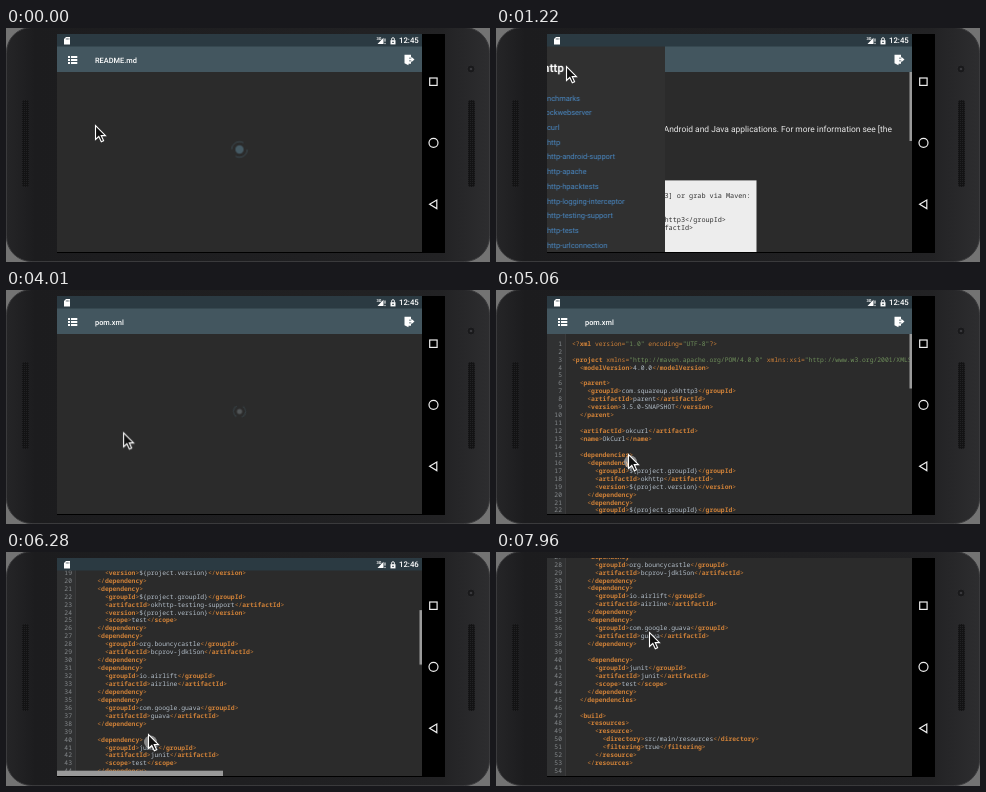
An HTML page that plays this animation: 484 px wide and 234 px high, repeating every 8 s.

```html
<!DOCTYPE html>
<html lang="en">
<head>
<meta charset="utf-8">
<title>Code browser on a phone</title>
<style>
@property --s { syntax: "<number>"; inherits: true; initial-value: 0; }
html, body { margin: 0; width: 100%; height: 100%; overflow: hidden; background: #737373; }
svg { display: block; width: 484px; height: 234px; text-rendering: geometricPrecision; font-family: Roboto, sans-serif; }
.code, .block { font-family: "Noto Sans Mono", "DejaVu Sans Mono", monospace; }
.code { font-size: 6.36px; fill: #b4bfca; }
.block { font-size: 6.83px; fill: #333; }
.num { fill: #85898c; text-anchor: end; }
.tag { fill: #cf8138; }
.name { font-weight: 700; }
.str { fill: #6f8f5b; }
.title { font-size: 7.4px; font-weight: 500; fill: #fff; }
.tree { font-size: 7.45px; fill: #4a8ac6; }
.line { fill: none; stroke: #999; stroke-width: .8; }

/* 1% = 80 ms */
#screen, #screen * { animation: 0s linear infinite; animation-duration: 8s; }
#screen { animation-name: scroll; }
#page { transform: translateY(calc(var(--s) * -1px)); }
#bar { transform: translateY(calc(max(-38, -1 * var(--s)) * 1px)); }
#thumb { transform: translateY(calc((max(-26, -1 * var(--s)) + max(0, var(--s) - 26) * .268) * 1px)); }
#screen .readme { animation-name: readme; animation-timing-function: step-end; }
#screen .old { animation-name: old; animation-timing-function: step-end; }
#screen .new { animation-name: new; animation-timing-function: step-end; }
#screen .pom { animation-name: pom; animation-timing-function: step-end; }
#screen .early { animation-name: early; animation-timing-function: step-end; }
#screen .late { animation-name: late; animation-timing-function: step-end; }
#screen .closed { animation-name: closed; animation-timing-function: step-end; }
#screen .open { animation-name: open; animation-timing-function: step-end; }
#screen #thumb0 { animation-name: thumb0; }
#screen #thumb rect { animation-name: thumb; }
#screen #hthumb { animation-name: hthumb; }
#screen #status { animation-name: status; }
#screen #drawer { animation-name: drawer; }
#screen #scrim { animation-name: scrim; }
#screen #below { animation-name: below; }
#screen #spin { animation-name: spin; animation-timing-function: step-end; }
#screen #dot { animation-name: dot; }
#screen #ring { animation-name: ring; }
#screen #cursor { animation-name: cursor; }
#screen #touch { animation-name: touch; animation-timing-function: step-end; }

@keyframes scroll {
  0%, 63.5% { --s: 0; } 68.2% { --s: 98; } 72.75% { --s: 150; }
  78.5% { --s: 175.7; } 83% { --s: 196; } 93.6% { --s: 250; } 99.5%, to { --s: 255.4; }
}
@keyframes readme { 0% { opacity: 0; } 2.875% { opacity: 1; } 45.6%, to { opacity: 0; } }
@keyframes old { 0% { opacity: 1; } 45.6%, to { opacity: 0; } }
@keyframes new { 0% { opacity: 0; } 45.6%, to { opacity: 1; } }
@keyframes pom { 0% { opacity: 0; } 58%, to { opacity: 1; } }
@keyframes early { 0% { opacity: 1; } 69%, to { opacity: 0; } }
@keyframes late { 0% { opacity: 0; } 69%, to { opacity: 1; } }
@keyframes closed { 0% { opacity: 1; } 26%, to { opacity: 0; } }
@keyframes open { 0% { opacity: 0; } 26%, to { opacity: 1; } }
@keyframes thumb0 { 0%, 21.5% { opacity: 1; } 23%, to { opacity: 0; } }
@keyframes thumb { 0%, 95% { opacity: 1; } 98%, to { opacity: 0; } }
@keyframes hthumb { 0%, 63.5% { opacity: 0; } 64.5%, 95% { opacity: 1; } 98%, to { opacity: 0; } }
@keyframes status { 0%, 95.5% { transform: none; } 98.5%, to { transform: translateY(-14px); } }
@keyframes drawer {
  0%, 11.5% { transform: translateX(-159px); } 15.25% { transform: translateX(-41px); }
  18.4%, 45.6% { transform: none; } 49.4%, to { transform: translateX(-159px); }
}
@keyframes scrim { 0%, 15.25% { opacity: 0; } 18.4%, 45.6% { opacity: .6; } 49.4%, to { opacity: 0; } }
@keyframes below { 0%, 26% { transform: none; } 28.2%, to { transform: translateY(44.1px); } }
@keyframes spin { 0% { opacity: 1; } .62% { opacity: 0; } 46% { opacity: 1; } 54%, to { opacity: 0; } }
@keyframes dot {
  0%, 46% { transform: scale(1); fill: #455a64; } 50.1% { transform: scale(.62); fill: #525658; }
  54%, to { transform: scale(1); fill: #455a64; }
}
@keyframes ring { 0%, 46% { transform: rotate(0); } 50.1% { transform: rotate(120deg) scale(.78); } 54%, to { transform: rotate(240deg); } }
@keyframes touch { 0% { opacity: 0; } 61% { opacity: 1; } 68.2% { opacity: 0; } 78.2% { opacity: 1; } 93.6%, to { opacity: 0; } }
@keyframes cursor {
  0%, 2.875% { transform: translate(89px, 97px); }
  7.9%, 16% { transform: translate(70px, 38px); }
  20.9% { transform: translate(98px, 95px); }
  23%, 26% { transform: translate(102px, 98px); }
  28.25%, 32% { transform: translate(92px, 97px); }
  34.1% { transform: translate(93px, 117px); }
  36.25%, 40% { transform: translate(92px, 119px); }
  42.1%, 45% { transform: translate(91px, 139px); }
  50.1% { transform: translate(117px, 142px); }
  54.4% { transform: translate(131px, 171px); }
  55.1%, 57.5% { transform: translate(131px, 172px); }
  58%, 63.3% { transform: translate(132px, 164px); }
  68.2% { transform: translate(138px, 60px); }
  72.75% { transform: translate(140px, 90px); }
  78.2%, 78.6% { transform: translate(142px, 182px); }
  83% { transform: translate(144px, 156px); }
  93.6% { transform: translate(152px, 84px); }
  99.5%, to { transform: translate(153px, 80px); }
}
</style>
</head>
<body>
<svg viewBox="0 0 484 234">
  <defs>
    <linearGradient id="body">
      <stop stop-color="#252527"/><stop offset=".06" stop-color="#1c1c1e"/>
      <stop offset=".9" stop-color="#222224"/><stop offset="1" stop-color="#2d2d2f"/>
    </linearGradient>
    <pattern id="mesh" width="2" height="2" patternUnits="userSpaceOnUse">
      <rect width="2" height="2" fill="#131314"/><rect width="1" height="1" fill="#212123"/>
    </pattern>
    <clipPath id="clip"><rect x="51" y="6" width="365" height="218"/></clipPath>
    <path id="folder" d="M0 .8q0-.8.8-.8H3l1 1h3.3q.8 0 .8.8v4.4q0 .8-.8.8H.8q-.8 0-.8-.8z" fill="#73a9dd"/>
    <g id="file">
      <path d="M.5.5h4.2l2 2v6H.5z" fill="none" stroke="#9a9a9a" stroke-width=".9"/>
      <path d="M2 3.6h3.2M2 5.2h3.2M2 6.8h3.2" stroke="#9a9a9a" stroke-width=".7"/>
    </g>
  </defs>

  <rect x=".5" y="-.5" width="483" height="234" rx="25" fill="url(#body)" stroke="#3a3a3c"/>
  <rect x="16" y="72" width="7" height="87" rx="3" fill="url(#mesh)"/>
  <rect x="462" y="72" width="7" height="87" rx="3" fill="url(#mesh)"/>
  <circle cx="465" cy="41" r="4" fill="#19191b" stroke="#2b2b2d"/>
  <circle cx="465" cy="41" r="1.3" fill="#39393d"/>
  <rect x="51" y="6" width="388" height="219" fill="#000"/>
  <g fill="none" stroke="#eee" stroke-width="1.2">
    <rect x="423.7" y="50" width="7.4" height="7.4"/>
    <circle cx="427.5" cy="114.8" r="4.5"/>
    <path d="M423.6 176.3l7.2-4.3v8.6z"/>
  </g>

  <g clip-path="url(#clip)">
  <g id="screen">
    <rect x="51" y="6" width="365" height="218" fill="#2b2b2b"/>

    <g class="readme">
      <g fill="#e8e8e8" font-size="8.44">
        <text x="58" y="75" font-size="15" font-weight="700">OkHttp</text>
        <text x="58" y="104">An HTTP &amp; HTTP/2 client for Android and Java applications. For more information see [the</text>
        <text x="58" y="115">website][1] and [the wiki][2].</text>
        <text x="58" y="140" font-size="12" font-weight="700">Download</text>
      </g>
      <rect x="58" y="152.4" width="202.5" height="80" fill="#eee"/>
      <g class="block" id="block"></g>
      <rect id="thumb0" x="413.5" y="44" width="2.5" height="69" fill="#9b9b9b"/>
    </g>

    <g class="pom">
      <rect x="51" y="6" width="18.5" height="218" fill="#303132"/>
      <path d="M69.5 6V224" stroke="#454545" stroke-width=".6"/>
      <g id="page" class="code"></g>
      <g id="thumb"><rect x="413.5" y="44" width="2.5" height="54.5" fill="#9b9b9b"/></g>
      <rect id="hthumb" x="51" y="218.7" width="166" height="5.3" fill="#999"/>
    </g>

    <g id="spin">
      <g transform="translate(233.5 121.5)">
        <circle id="dot" r="4.2" fill="#455a64"/>
        <circle id="ring" r="7.8" fill="none" stroke="#455a64" stroke-width=".9" stroke-dasharray="16.3 8.2" opacity=".75"/>
      </g>
    </g>

    <g id="bar">
      <rect x="51" y="18" width="365" height="26" fill="#43565f"/>
      <path d="M62 28h2v2h-2zm3 0h6.3v2H65zM62 31h2v2h-2zm3 0h6.3v2H65zM62 34h2v2h-2zm3 0h6.3v2H65z" fill="#fff"/>
      <text class="title old" x="89" y="34.6">README.md</text>
      <text class="title new" x="89" y="34.6">pom.xml</text>
      <g transform="translate(0 -.8)" fill="#fff">
        <path d="M398.5 27.5h6.5v3h-2v3.500h2v2.500h-2.500v1.500l-4-2z"/>
        <path d="M403 31.3h2.300v-1.800l3.200 2.800-3.200 2.800v-1.800H403z"/>
      </g>
    </g>

    <rect id="scrim" x="51" y="18" width="365" height="206" fill="#000"/>
    <g id="drawer">
      <rect x="51" y="18" width="159" height="206" fill="#303030"/>
      <rect x="59.5" y="34.5" width="9.5" height="10.5" rx="1" fill="#fff"/>
      <path d="M62.3 35v4.5l1.3-1 1.3 1V35z" fill="#303030"/>
      <text x="75" y="44" font-size="11.7" font-weight="700" fill="#fff">okhttp</text>
      <g class="tree" id="tree"></g>
    </g>

    <g id="status">
      <rect x="51" y="6" width="365" height="12.5" fill="#2b3a42"/>
      <path d="M60 9h4v7.5h-6V11z" fill="#fff"/>
      <path d="M60.3 10.2v1.5m1.3-1.5v1.5m1.3-1.5v1.5" stroke="#2b3a42" stroke-width=".6"/>
      <text x="370.5" y="12.3" font-size="4" font-weight="700" fill="#fff">3G</text>
      <path d="M377.5 9.8V16h-6z" fill="#fff"/>
      <path d="M379 10.5v3.2m0 1.2v1.2" stroke="#fff"/>
      <path d="M385.6 12.5v-1.4q0-1.4 1.4-1.4t1.4 1.4v1.4" fill="none" stroke="#fff" stroke-width=".9"/>
      <path d="M384.5 12.2h5v4.2h-5z" fill="#fff"/>
      <path d="M386 14.3h2" stroke="#2b3a42" stroke-width=".9"/>
      <g font-size="7.8" font-weight="500" fill="#fff">
        <text class="early" x="393" y="15.2">12:45</text>
        <text class="late" x="393" y="15.2">12:46</text>
      </g>
    </g>

    <g id="cursor">
      <circle id="touch" cx="2.5" cy="8" r="6.5" fill="#fff" fill-opacity=".45"/>
      <path d="M.5.5v14l3.300-3 2.500 5.300 2.300-1.100-2.400-5.100h4.300z" fill="#111" stroke="#fff" stroke-width="1.1"/>
    </g>
  </g>
  </g>
</svg>

<script type="text/plain" id="src">
<?xml version="1.0" encoding="UTF-8"?>

<project xmlns="http://maven.apache.org/POM/4.0.0" xmlns:xsi="http://www.w3.org/2001/XMLSchema-instance">
  <modelVersion>4.0.0</modelVersion>

  <parent>
    <groupId>com.squareup.okhttp3</groupId>
    <artifactId>parent</artifactId>
    <version>3.5.0-SNAPSHOT</version>
  </parent>

  <artifactId>okcurl</artifactId>
  <name>OkCurl</name>

  <dependencies>
    <dependency>
      <groupId>${project.groupId}</groupId>
      <artifactId>okhttp</artifactId>
      <version>${project.version}</version>
    </dependency>
    <dependency>
      <groupId>${project.groupId}</groupId>
      <artifactId>okhttp-testing-support</artifactId>
      <version>${project.version}</version>
      <scope>test</scope>
    </dependency>
    <dependency>
      <groupId>org.bouncycastle</groupId>
      <artifactId>bcprov-jdk15on</artifactId>
    </dependency>
    <dependency>
      <groupId>io.airlift</groupId>
      <artifactId>airline</artifactId>
    </dependency>
    <dependency>
      <groupId>com.google.guava</groupId>
      <artifactId>guava</artifactId>
    </dependency>

    <dependency>
      <groupId>junit</groupId>
      <artifactId>junit</artifactId>
      <scope>test</scope>
    </dependency>
  </dependencies>

  <build>
    <resources>
      <resource>
        <directory>src/main/resources</directory>
        <filtering>true</filtering>
      </resource>
    </resources>
</script>
<script>
const $ = id => document.getElementById(id);
const escape = s => s.replace(/</g, '&lt;').replace(/>/g, '&gt;');
const span = (cls, s) => `<tspan class="${cls}">${s}</tspan>`;
const indent = s => s.length - s.trimStart().length;
const textAt = (x, y, s, cls = '') => `<text class="${cls}" x="${x}" y="${y}">${s}</text>`;

// XML listing with line numbers
const highlight = s => s.replace(/<([/?]?)(\w+)([^>]*)>/g, (_, mark, name, rest) =>
  span('tag', `&lt;${mark}${span('name', name)}${rest.replace(/"[^"]*"/g, m => span('str', m))}&gt;`));
const lines = [...$('src').textContent.trim().split('\n'), ''];
$('page').innerHTML = lines.map((s, i) => {
  const y = 55.7 + i * 7.94;
  return textAt(66, y, i + 1, 'num') + textAt(76 + indent(s) * 3.815, y, highlight(s.trim()));
}).join('');

// Snippet in the readme
const snippet = ['Download [the latest JAR][3] or grab via Maven:', '', '<dependency>',
  '  <groupId>com.squareup.okhttp3</groupId>', '  <artifactId>okhttp</artifactId>',
  '  <version>3.4.1</version>', '</dependency>'];
$('block').innerHTML = snippet.map((s, i) =>
  textAt(62 + indent(s) * 4.1, 170.2 + i * 8, escape(s.trim()))).join('');

// File tree
const pitch = 14.7;
const arrow = (x, y, cls) => `<path class="line ${cls}" d="M${x} ${y - 2.5}l3.6 2.5-3.6 2.5z"/>`;
const icon = (id, x, y) => `<use href="#${id}" x="${x}" y="${y}"/>`;
const folder = (name, row, dx = 0, cls = '') => {
  const y = 70 + row * pitch;
  return arrow(62.5 + dx, y, cls) + icon('folder', 72 + dx, y - 3.5) + textAt(84 + dx, y + 2.6, name);
};
const file = (name, row) => {
  const y = 70 + row * pitch;
  return icon('file', 76, y - 4.5) + textAt(87, y + 2.6, name);
};
const modules = ['', '-android-support', '-apache', '-hpacktests', '-logging-interceptor',
  '-testing-support', '-tests', '-urlconnection'];
$('tree').innerHTML = folder('benchmarks', 0) + folder('mockwebserver', 1) + folder('okcurl', 2, 0, 'closed') +
  `<g class="open"><path d="M62 101l4-4v4z" fill="#0c0c0c"/>` +
  folder('src', 3, 4) + file('README.md', 4) + file('pom.xml', 5) + '</g>' +
  `<g id="below">${modules.map((m, i) => folder('okhttp' + m, i + 3)).join('')}</g>`;
</script>
</body>
</html>
```
